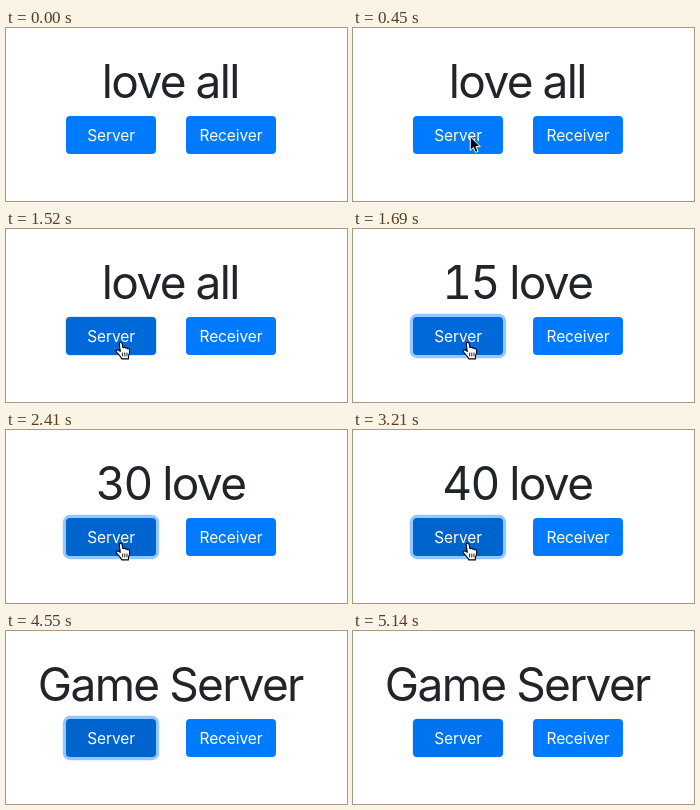
Write an HTML page that moves like this. It is 341 by 173 pixels and loops after 5.24 s.

```html
<!DOCTYPE html>
<html lang="en">
<head>
<meta charset="utf-8">
<title>Tennis score</title>
<style>
  html, body { margin: 0; width: 100%; height: 100%; overflow: hidden; background: #fff; }
  svg { display: block; width: 100%; height: 100%; }
  text {
    font-family: Inter, "Open Sans", sans-serif;
    font-optical-sizing: none;
    font-variant-numeric: tabular-nums;
    text-anchor: middle;
  }
  #score { font-size: 46px; letter-spacing: -1.65px; fill: #212529; }
  .label { font-size: 15.5px; letter-spacing: -.1px; fill: #fff; }
  .button { fill: #007bff; }
  #ring { fill: #93c7ff; }
  #hand { fill: #fff; stroke: #000; stroke-linejoin: round; stroke-linecap: round; }
  #arrow { fill: #000; stroke: #fff; stroke-linejoin: round; }
</style>
</head>
<body>
<svg viewBox="0 0 341 173">
  <text id="score" x="164.3" y="70">love all</text>
  <rect id="ring"/>
  <rect id="server" class="button" x="60" y="88" width="90" height="38" rx="4"/>
  <rect class="button" x="180" y="88" width="90" height="38" rx="4"/>
  <text class="label" x="105" y="113">Server</text>
  <text class="label" x="225" y="113">Receiver</text>
  <g id="hand">
    <g transform="scale(1.08)">
      <path d="M4.5 9 L3.6 2.2 Q3.4 .7 4.6 .6 Q5.8 .5 6.2 1.9 L7 5.6 Q8.8 4.7 9.3 6 Q10.8 5.4 11.3 6.7 Q13 6.2 13.2 8 Q13.4 11 12.2 13 L12 16 L6 16 Q4.6 13.5 2.9 11.8 L.9 9.6 Q.2 8.2 1.5 7.7 Q2.8 7.6 4.5 9Z"/>
      <path d="M6.7 10.5V13.3M8.7 10.5V13.3M10.7 10.5V13.3" stroke-width=".8"/>
    </g>
  </g>
  <path id="arrow" d="M0 0V14L3.2 11L5.3 16L7.8 15L5.7 10.2H10Z"/>
</svg>
<script>
const LOOP = 5240;
const $ = id => document.getElementById(id);
const score = $('score'), ring = $('ring'), server = $('server');
const hand = $('hand'), arrow = $('arrow');

const scores = [
  [0, 'love all'], [1610, '15 love'], [2410, '30 love'],
  [3210, '40 love'], [4010, 'Game Server']
];
// Time, darkness of the server button, strength of its focus ring
const states = [
  [0, 0, 0], [1250, 0.06, 0], [1340, 1, 0], [1520, 1, 0.35],
  [1610, 1, 0.9], [1690, 1, 1], [2410, 1.3, 1], [5140, 0.4, 0.3]
];

const current = (list, t) => list.filter(item => item[0] <= t).pop();
const mix = (a, b, k) => Math.round(a + (b - a) * k);

function place(el, pos) {
  el.style.display = pos ? '' : 'none';
  if (pos) el.setAttribute('transform', `translate(${pos})`);
}

// The focus ring grows out of the button as it fades in
function drawRing(glow) {
  const spread = 3.2 * glow;
  const box = {
    x: 60 - spread, y: 88 - spread,
    width: 90 + 2 * spread, height: 38 + 2 * spread,
    rx: 4 + spread, opacity: glow
  };
  for (const key in box) ring.setAttribute(key, box[key]);
}

function arrowAt(t) {
  if (t >= 180 && t < 1250) {
    const left = 1 - Math.min(4, Math.floor((t - 180) / 90)) / 4;
    return [112 + 84 * left ** 2, 105 + 55 * left ** 2];
  }
  return t >= 4460 && t < 4550 ? [171, 158] : null;
}

function handAt(t) {
  if (t < 1250 || t >= 4460) return null;
  return t < 1340 ? [108.6, 109.6] : [109.4, 112.6];
}

function draw(t) {
  const text = current(scores, t)[1];
  if (score.textContent !== text) score.textContent = text;
  const [, dark, glow] = current(states, t);
  server.style.fill = `rgb(0, ${mix(123, 105, dark)}, ${mix(255, 217, dark)})`;
  drawRing(glow);
  place(arrow, arrowAt(t));
  place(hand, handAt(t));
}

const start = performance.now();
function tick() {
  draw((performance.now() - start) % LOOP);
  requestAnimationFrame(tick);
}
tick();
</script>
</body>
</html>
```
